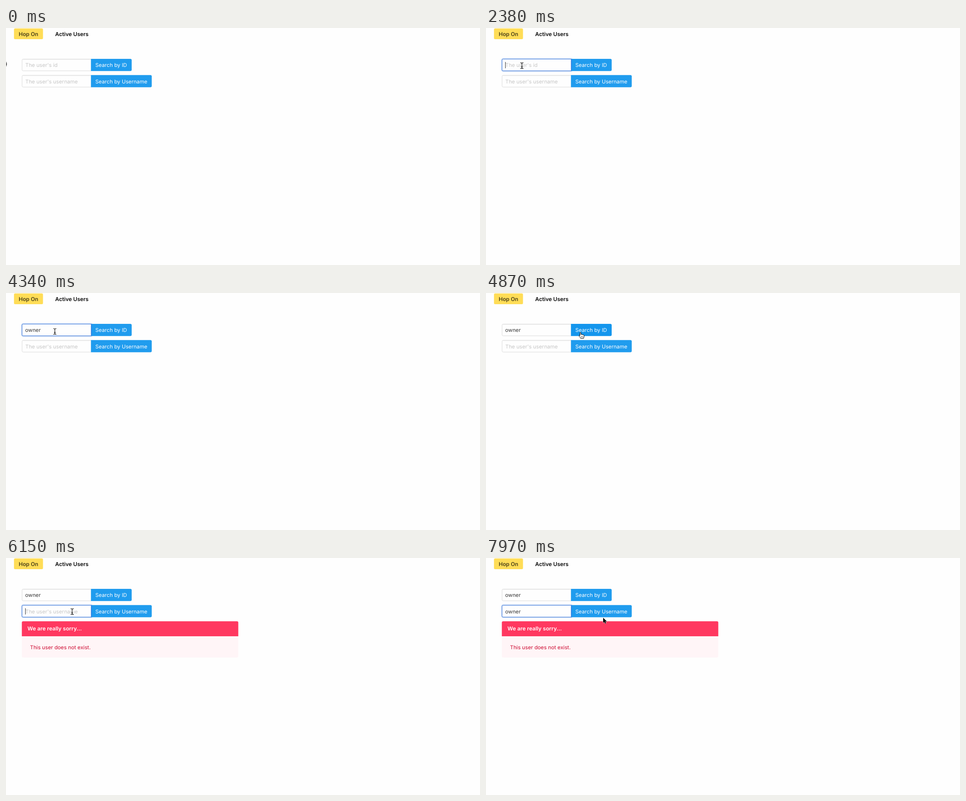
Animation, 1056 px wide and 530 px high, one loop 8 s. Source, as an HTML page:

```html
<!DOCTYPE html>
<html lang="en">
<head>
<meta charset="utf-8">
<title>User search</title>
<style>
  html, body { margin: 0; width: 100%; height: 100%; overflow: hidden; background: #fefefe; }
  svg { display: block; }
  text { font: 400 11.7px Inter, "Open Sans", sans-serif; text-rendering: geometricPrecision; white-space: pre; }
  .bold { font-weight: 600; font-size: 12.1px; }
  .label { fill: #fff; }
  .hint { fill: #c6c6c6; }
  .value { fill: #363636; }
</style>
</head>
<body>
<svg id="stage" width="1056" height="530" viewBox="0 0 1056 530">
  <defs>
    <path id="beamShape" d="M-3.4 -6.5C-1 -6.5 0 -6 0 -4.5C0 -6 1 -6.5 3.4 -6.5M0 -4.5V4.5M-3.4 6.5C-1 6.5 0 6 0 4.5C0 6 1 6.5 3.4 6.5M-1.8 2.4H1.8"/>
  </defs>

  <rect x="17.8" y="1.1" width="64.6" height="24" rx="2.5" fill="#ffdd57"/>
  <text class="bold" x="50" y="17.8" text-anchor="middle" fill="#4d431a">Hop On</text>
  <text class="bold" x="109.6" y="17.8" fill="#0a0a0a">Active Users</text>

  <g id="fields"></g>

  <g id="message">
    <rect x="35.3" y="141.5" width="482.2" height="81" rx="3" fill="#fff5f7"/>
    <path d="M35.3 175V144.5a3 3 0 0 1 3-3H514.5a3 3 0 0 1 3 3V175Z" fill="#ff3860"/>
    <text class="bold" x="47.8" y="162.3" fill="#fff">We are really sorry...</text>
    <text x="53.6" y="203.6" fill="#cd0930">This user does not exist.</text>
  </g>

  <g id="edge">
    <path d="M-1 80.8H2.4M.6 77.8V83.8M0 76.8H1.4M0 84.8H1.4" stroke="#222" stroke-width="1.1" fill="none"/>
  </g>
  <g id="arrow">
    <path d="M0 0V11.6L2.6 9.2L4.3 13.1L6.4 12.2L4.7 8.4H8.3Z" fill="#000" stroke="#fff" stroke-width="1" paint-order="stroke"/>
  </g>
  <g id="beam" fill="none">
    <use href="#beamShape" stroke="#fff" stroke-width="2.4"/>
    <use href="#beamShape" stroke="#111" stroke-width="1.2"/>
  </g>
  <g id="hand" stroke="#000" stroke-width="1" stroke-linejoin="round">
    <path d="M-1.2 7.6V1C-1.2 -.4 1.2 -.4 1.2 1V5C1.6 4 3.5 4.1 3.6 5.4C4.2 4.6 5.9 4.8 6 6C6.8 5.4 8.1 5.8 8.1 7V9.2C8.1 11 7 11.7 6.8 13.6H.4C.1 11.8 -1.6 10.8 -3 8.4C-3.9 6.8 -2.2 6.1 -1.2 7.6Z" fill="#fff"/>
    <path d="M1.5 8.6V11.4M3.5 8.6V11.4M5.5 8.6V11.4" stroke-width=".7"/>
  </g>
</svg>
<script>
const LOOP = 8000;
const WORD = "owner";
const $ = id => document.getElementById(id);

function add(parent, tag, attrs, content = "") {
  const node = document.createElementNS("http://www.w3.org/2000/svg", tag);
  for (const key in attrs) node.setAttribute(key, attrs[key]);
  node.textContent = content;
  return parent.appendChild(node);
}

const show = (node, visible) => node.setAttribute("display", visible ? "inline" : "none");
const within = (t, spans) => spans.some(([from, to]) => t >= from && t < to);

// All spans are [start, end) in ms
const fields = [
  { top: 69, right: 280, hint: "The user's id", label: "Search by ID",
    keys: [2920, 3000, 3260, 3440, 3620],
    hover: [[2030, 2380]], focus: [[2380, 4870]],
    caret: [[2380, 2830], [2920, 4070], [4610, 4870]], pressed: [[4690, 5590]] },
  { top: 105.3, right: 324.7, hint: "The user's username", label: "Search by Username",
    keys: [6690, 6870, 7140, 7230, 7320],
    hover: [[5770, 6150]], focus: [[6150, LOOP]],
    caret: [[6150, 7760]], pressed: [[5680, 5770]] }
];

// Pointer path: time, shape, x, y; each pose holds until the next
const pointer = [
  [0, "edge", 0, 0], [90, "", 0, 0],
  [1200, "arrow", 1, 76], [1290, "arrow", 14, 82], [1380, "arrow", 32, 88],
  [1470, "arrow", 50, 92], [1560, "arrow", 65, 93], [1650, "arrow", 73.4, 91.6],
  [1740, "arrow", 79.5, 89], [1830, "beam", 80, 86.5], [1950, "beam", 80, 84.7],
  [2210, "beam", 80, 84.2], [2920, "", 0, 0],
  [4340, "beam", 108.8, 86], [4430, "beam", 137, 88], [4520, "beam", 168, 90],
  [4610, "beam", 186, 91], [4690, "hand", 202, 89], [4780, "hand", 209, 88.5],
  [4870, "hand", 210.5, 88], [5050, "hand", 210.5, 87],
  [5500, "hand", 211, 88.5], [5590, "arrow", 208, 98], [5680, "hand", 195, 107],
  [5770, "beam", 170, 115], [5880, "beam", 152, 119], [5970, "beam", 147.4, 119.8],
  [6690, "", 0, 0], [7850, "arrow", 238, 137.5], [7970, "arrow", 261, 133.6]
];

for (const f of fields) {
  const g = $("fields"), base = f.top + 18.4;
  const left = 35.8, right = 189.8, y = f.top + .5, bottom = f.top + 26.8;
  const outline = `M${right} ${y}H${left + 2.5}a2.5 2.5 0 0 0 -2.5 2.5V${bottom - 2.5}a2.5 2.5 0 0 0 2.5 2.5H${right}Z`;
  f.border = add(g, "path", { d: outline, fill: "none" });
  add(g, "path", { d: `M37.5 ${y + 1}H${right - .5}`, stroke: "#0a0a0a", "stroke-opacity": .06 });
  f.button = add(g, "path", { d: `M189.3 ${f.top}H${f.right - 3}a3 3 0 0 1 3 3V${f.top + 24.3}a3 3 0 0 1 -3 3H189.3Z` });
  add(g, "text", { class: "label", x: 199.1, y: base }, f.label);
  // The focus ring lies above the button, the plain border below it
  f.ring = add(g, "g", { fill: "none", stroke: "#3273dc" });
  add(f.ring, "path", { d: outline, "stroke-opacity": .25, "stroke-width": 4 });
  add(f.ring, "path", { d: outline, fill: "#fefefe" });
  f.hintText = add(g, "text", { class: "hint", x: 43.1, y: base }, f.hint);
  f.value = add(g, "text", { class: "value", x: 42.8, y: base });
  f.bar = add(g, "rect", { y: f.top + 7, width: 1, height: 14, fill: "#222" });
}

function drawField(f, t) {
  const typed = WORD.slice(0, f.keys.filter(k => t >= k).length);
  if (f.value.textContent !== typed) f.value.textContent = typed;
  show(f.hintText, !typed);
  show(f.ring, within(t, f.focus));
  f.border.setAttribute("stroke", within(t, f.hover) ? "#b5b5b5" : "#dbdbdb");
  f.button.setAttribute("fill", within(t, f.pressed) ? "#1496ed" : "#209cee");
  show(f.bar, within(t, f.caret));
  f.bar.setAttribute("x", 42.8 + (typed ? f.value.getComputedTextLength() : 0));
}

function draw(t) {
  fields.forEach(f => drawField(f, t));
  show($("message"), t >= 5050);
  const [, shape, x, y] = pointer.findLast(p => t >= p[0]);
  for (const id of ["edge", "arrow", "beam", "hand"]) {
    show($(id), id === shape);
    if (id === shape) $(id).setAttribute("transform", `translate(${x} ${y})`);
  }
}

const start = performance.now();
function tick(now) {
  draw(Math.max(0, now - start) % LOOP);
  requestAnimationFrame(tick);
}
draw(0);
requestAnimationFrame(tick);
</script>
</body>
</html>
```
